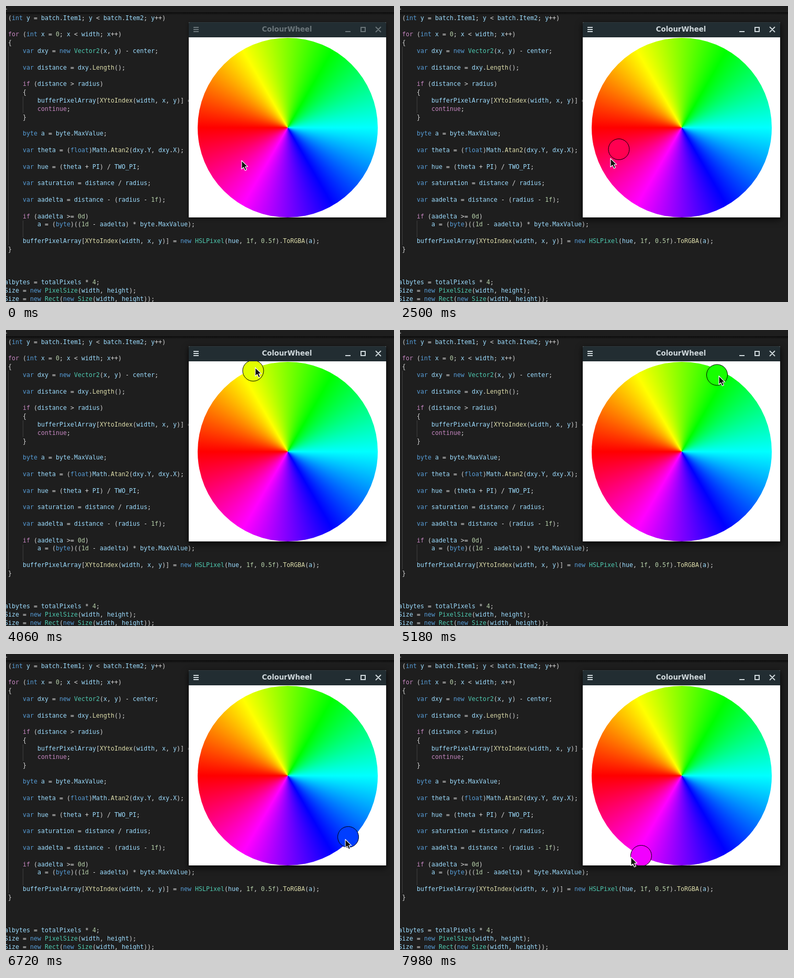
An HTML page that plays this animation: 741 by 567 pixels, repeating every 8000 ms.

```html
<!DOCTYPE html>
<html lang="en">
<head>
<meta charset="utf-8">
<title>Colour wheel</title>
<style>
  html, body { margin: 0; width: 100%; height: 100%; overflow: hidden; background: #1e1e1e; }
  #stage { position: absolute; left: 0; top: 0; width: 741px; height: 567px; overflow: hidden; }
  svg { position: absolute; left: 0; top: 0; }
  #code div {
    position: absolute; left: -3px; white-space: pre; color: #d4d4d4;
    font: 11.63px/16px "DejaVu Sans Mono", monospace;
  }
  #strip { position: absolute; top: 12px; width: 100%; height: 5px; background: linear-gradient(rgba(0, 0, 0, .65), transparent); }
  #shade, #win { position: absolute; left: 349px; top: 31px; width: 377px; height: 374px; border-radius: 2px 2px 0 0; }
  #shade { box-shadow: 0 5px 14px rgba(0, 0, 0, .5); }
  #win { background: #fff; box-shadow: 0 2px 6px rgba(0, 0, 0, .5); overflow: hidden; }
  #bar { height: 29px; background: #222d32; box-shadow: inset 0 1px rgba(207, 216, 220, .07); }
  #title {
    position: absolute; left: 0; top: 31px; width: 1073px; text-align: center; color: #cfd8dc;
    font: bold 13.333px/28px "DejaVu Sans", sans-serif;
  }
  #wheel {
    position: absolute; left: 17px; top: 30px; width: 344px; height: 344px; border-radius: 50%;
    background: conic-gradient(from 270deg, #f00, #ff0, #0f0, #0ff, #00f, #f0f, #f00);
  }
</style>
</head>
<body>
<div id="stage">
  <div id="code"></div>
  <div id="strip"></div>
  <svg width="741" height="567">
    <rect y="5" width="2" height="2" fill="#777"/>
    <path d="M4.5 78V458M32.5 173V205M32.5 411V443" stroke="#404040"/>
  </svg>
  <div id="shade"></div>
  <div id="win"><div id="bar"></div><div id="wheel"></div></div>
  <div id="chrome">
    <div id="title">ColourWheel</div>
    <svg width="741" height="567" fill="#cfd8dc">
      <path d="M358 40h10v2h-10zM358 44h10v2h-10zM358 48h10v2h-10zM648 48h10v2h-10z"/>
      <path d="M678 41h8v8h-8zM706 40l10 10M716 40l-10 10" fill="none" stroke="#cfd8dc" stroke-width="2"/>
    </svg>
  </div>
  <svg width="741" height="567">
    <clipPath id="client"><rect x="349" y="60" width="377" height="345"/></clipPath>
    <g clip-path="url(#client)"><circle id="thumb" r="20" stroke="#000"/></g>
    <path id="cursor" d="M0 0V16.5L3.8 13L6.5 19L9.5 17.7L6.9 11.8H11.8Z" fill="#111" stroke="#fff" stroke-width="1.1" stroke-linejoin="round"/>
  </svg>
</div>
<script>
const $ = id => document.getElementById(id);

const code = ` (int y = batch.Item1; y < batch.Item2; y++)

 for (int x = 0; x < width; x++)
 {
     var dxy = new Vector2(x, y) - center;

     var distance = dxy.Length();

     if (distance > radius)
     {
         bufferPixelArray[XYtoIndex(width, x, y)] =
         continue;
     }

     byte a = byte.MaxValue;

     var theta = (float)Math.Atan2(dxy.Y, dxy.X);

     var hue = (theta + PI) / TWO_PI;

     var saturation = distance / radius;

     var aadelta = distance - (radius - 1f);

     if (aadelta >= 0d)
         a = (byte)((1d - aadelta) * byte.MaxValue);

     bufferPixelArray[XYtoIndex(width, x, y)] = new HSLPixel(hue, 1f, 0.5f).ToRGBA(a);
 }



albytes = totalPixels * 4;
Size = new PixelSize(width, height);
Size = new Rect(new Size(width, height));`;

function tint(word, next) {
  if (/^\d/.test(word)) return '#b5cea8';
  if (/^(for|if|continue)$/.test(word)) return '#c586c0';
  if (/^(int|var|new|byte|float)$/.test(word) && next !== '.') return '#569cd6';
  if (next !== '(') return '#9cdcfe';
  return /^(Vector2|PixelSize|HSLPixel|Rect|Size)$/.test(word) ? '#4ec9b0' : '#dcdcaa';
}

code.split('\n').forEach((str, row) => {
  const line = document.createElement('div');
  line.style.top = Math.round(14.6 + row * 15.83) + 'px';
  for (const m of str.matchAll(/\d[\d.]*[fd]?|\w+|\W+?/g)) {
    const span = document.createElement('span');
    span.textContent = m[0];
    if (/\w/.test(m[0])) span.style.color = tint(m[0], str[m.index + m[0].length]);
    line.append(span);
  }
  $('code').append(line);
});

// turning points of the drag: time, thumb x y, pointer x y
const keys = [
  [2400, 450, 296, 450, 296], [2500, 418, 274.5, 402, 292], [3200, 368, 203, 368, 179],
  [3640, 407, 122, 420, 95], [4060, 472, 78, 476, 72], [4360, 486, 74, 491, 69],
  [5180, 605.5, 86, 609, 88], [5580, 644, 107, 659, 112], [6160, 690, 208, 694, 248],
  [6720, 653.5, 350.5, 648, 355], [7260, 595, 391, 570, 394], [7980, 460.5, 386.5, 441, 389]
];
const STEP = 105;
const CX = 538, CY = 233;
const polar = (x, y) => [Math.hypot(x - CX, y - CY), Math.atan2(y - CY, x - CX)];
const clamp = v => Math.max(0, Math.min(1, v));

// sweep round the wheel centre between two points
function sweep(x0, y0, x1, y1, k) {
  const [r0, a0] = polar(x0, y0), [r1, a1] = polar(x1, y1);
  const turn = Math.atan2(Math.sin(a1 - a0), Math.cos(a1 - a0));
  const r = r0 + (r1 - r0) * k, a = a0 + turn * k;
  return [CX + r * Math.cos(a), CY + r * Math.sin(a)];
}

function draw(t) {
  let i = 0;
  while (i < keys.length - 2 && keys[i + 1][0] <= t) i++;
  const p = keys[i], q = keys[i + 1], span = q[0] - p[0];
  const n = Math.round(span / STEP);
  const k = Math.floor(clamp((t - p[0]) / span) * n) / n;
  const [x, y] = sweep(p[1], p[2], q[1], q[2], k);
  const [px, py] = sweep(p[3], p[4], q[3], q[4], k);
  const hue = polar(x, y)[1] * 180 / Math.PI + 180;

  const thumb = $('thumb');
  thumb.setAttribute('cx', x);
  thumb.setAttribute('cy', y);
  thumb.setAttribute('fill', `hsl(${hue}, 100%, 50%)`);
  thumb.setAttribute('visibility', t >= 1080 ? 'visible' : 'hidden');
  $('cursor').setAttribute('transform', `translate(${px} ${py})`);

  // the window gains focus in four steps
  const focus = clamp(Math.floor((t - 920) / 80) / 4);
  $('chrome').style.opacity = .42 + .58 * focus;
  $('shade').style.opacity = focus;
}

const start = performance.now();
function loop() {
  draw((performance.now() - start) % 8000);
  requestAnimationFrame(loop);
}
loop();
</script>
</body>
</html>
```
